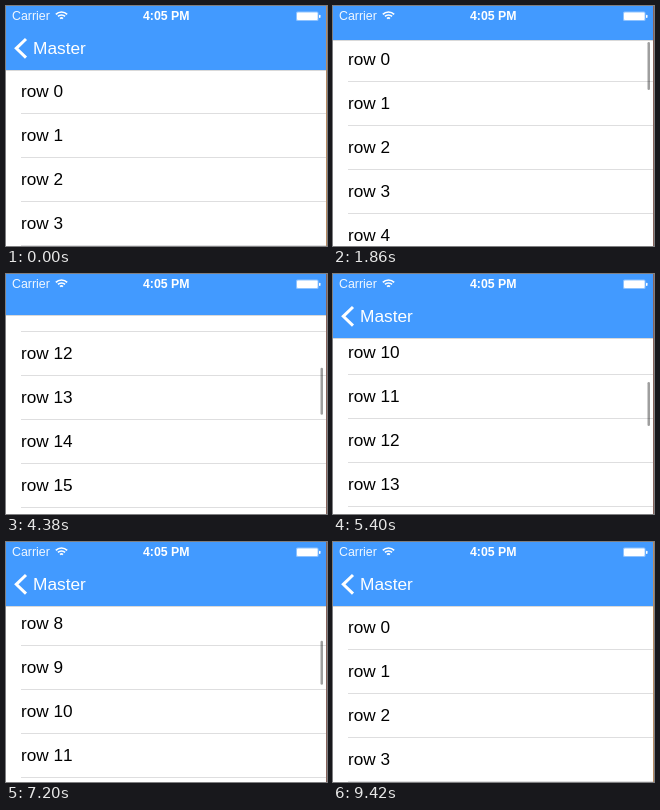
An HTML page with a canvas that plays this animation: 321x240 px, repeating every 9.48 s.

```html
<!DOCTYPE html>
<html lang="en">
<head>
<meta charset="utf-8">
<title>Shrinking navigation bar</title>
<style>
html, body { margin: 0; width: 100%; height: 100%; overflow: hidden; background: #fff; }
canvas { display: block; width: 321px; height: 240px; }
</style>
</head>
<body>
<canvas id="stage"></canvas>
<script>
const W = 321, H = 240, LOOP = 9480, STEP = 60;
const OPEN = 64, SHUT = 20, ROW = 44, SLACK = 2, FADE = 240;
const FONT = '"Liberation Sans", Arial, sans-serif';
const ARROW = new Path2D('M0 0v15l3.5-3 2.5 5.5 2.3-1-2.3-5.5h4.8z');

// Each drag eases the list from where the last one left it
const drags = [
  { at: 1260, to: 43 },
  { at: 1900, to: 109, time: 420 },
  { at: 3180, to: 555, time: 540 },
  { at: 4125, to: 447 },
  { at: 5400, to: 520 },
  { at: 6300, to: 356 },
  { at: 7290, to: 450 },
  { at: 8610, to: 0, time: 540 }
];

const canvas = document.getElementById('stage');
const ratio = window.devicePixelRatio || 1;
canvas.width = Math.round(W * ratio);
canvas.height = Math.round(H * ratio);
const c = canvas.getContext('2d');
c.fontKerning = 'none';

const clamp = (v, lo, hi) => Math.min(hi, Math.max(lo, v));
const part = (t, a, b) => clamp((t - a) / (b - a), 0, 1);
const ease = (t, a, b) => {
  const u = part(t, a, b);
  return u * u * (3 - 2 * u);
};

// The bar follows the list, shrinking after a little slack
function scrollAt(t) {
  let offset = 0, bar = OPEN, glow = 0, from = 0;
  for (const { at, to, time = 900 } of drags) {
    if (t < at) break;
    const d = (to - from) * ease(t, at, at + time);
    offset += d;
    bar = clamp(bar - (d > 0 ? Math.max(0, d - SLACK) : d), SHUT, OPEN);
    glow = 1 - part(t, at + time, at + time + FADE);
    from = to;
  }
  return { offset: Math.round(offset), bar: Math.round(bar), glow };
}

function text(str, x, y, font, color) {
  c.font = font + ' ' + FONT;
  c.fillStyle = color;
  c.fillText(str, x, y);
}

function rect(x, y, w, h, color, radius = 0) {
  c.fillStyle = color;
  c.beginPath();
  c.roundRect(x, y, w, h, radius);
  c.fill();
}

function drawRows(offset) {
  const first = Math.max(0, Math.floor(offset / ROW) - 1);
  for (let n = first; n < first + 8; n++) {
    const y = n * ROW - offset;
    text('row ' + n, 15, y + 91.4, '17.2px', '#000');
    rect(15, y + 107, 305, 1, '#dededf');
  }
}

function drawIndicator(offset, bar, glow) {
  c.globalAlpha = glow;
  rect(314.5, bar - 1.2 + offset * 0.101, 2.5, 52.7 - 0.136 * bar, 'rgba(0,0,0,.38)', 1.25);
  c.globalAlpha = 1;
}

function drawWifi(x, y) {
  c.strokeStyle = '#fff';
  c.lineWidth = 1.7;
  for (let r = 2; r < 9; r += 3) {
    c.beginPath();
    c.arc(x, y, r, -Math.PI * 0.75, -Math.PI * 0.25);
    c.stroke();
  }
}

function drawStatus() {
  text('Carrier', 6, 14, '12.4px', 'rgba(255,255,255,.92)');
  text('4:05 PM', 137, 14, 'bold 12.3px', '#fff');
  drawWifi(55.5, 14);
  rect(290, 5.5, 22.5, 9.5, 'rgba(255,255,255,.4)', 1.5);
  rect(291, 6.5, 20.6, 7.6, '#fff', 1);
  rect(313, 8.7, 1.5, 3.2, '#fff', 0.7);
}

function drawBar(bar) {
  rect(0, 0, 320, bar, '#429aff');
  rect(0, bar, 320, 1, 'rgba(0,0,0,.15)');
  c.globalAlpha = clamp((bar - 42) / 22, 0, 1);
  c.strokeStyle = '#fff';
  c.lineWidth = 3;
  c.beginPath();
  c.moveTo(20, bar - 31);
  c.lineTo(10.3, bar - 21.7);
  c.lineTo(20, bar - 12.4);
  c.stroke();
  text('Master', 27, bar - 16, '17.3px', '#fff');
  c.globalAlpha = 1;
  drawStatus();
}

// The pointer crosses down, returns to the status bar, then leaves
function drawPointer(t) {
  const down = ease(t, 60, 600), up = ease(t, 7800, 8400), exit = ease(t, 8940, 9180);
  c.save();
  c.translate(186 - 27 * down + 14 * up, 270 * down - 30 - 232 * up - 40 * exit);
  c.fillStyle = '#000';
  c.fill(ARROW);
  c.strokeStyle = '#fff';
  c.lineWidth = 1;
  c.stroke(ARROW);
  c.restore();
}

function draw(now) {
  const t = Math.floor((now % LOOP) / STEP) * STEP;
  const { offset, bar, glow } = scrollAt(t);
  c.setTransform(ratio, 0, 0, ratio, 0, 0);
  rect(0, 0, W, H, '#fff');
  drawRows(offset);
  drawIndicator(offset, bar, glow);
  drawBar(bar);
  rect(320, 0, 1, H, t >= 1260 && t < 9000 ? '#85625a' : '#b58a62');
  drawPointer(t);
}

const start = performance.now();
function tick() {
  draw(performance.now() - start);
  requestAnimationFrame(tick);
}
tick();
</script>
</body>
</html>
```
